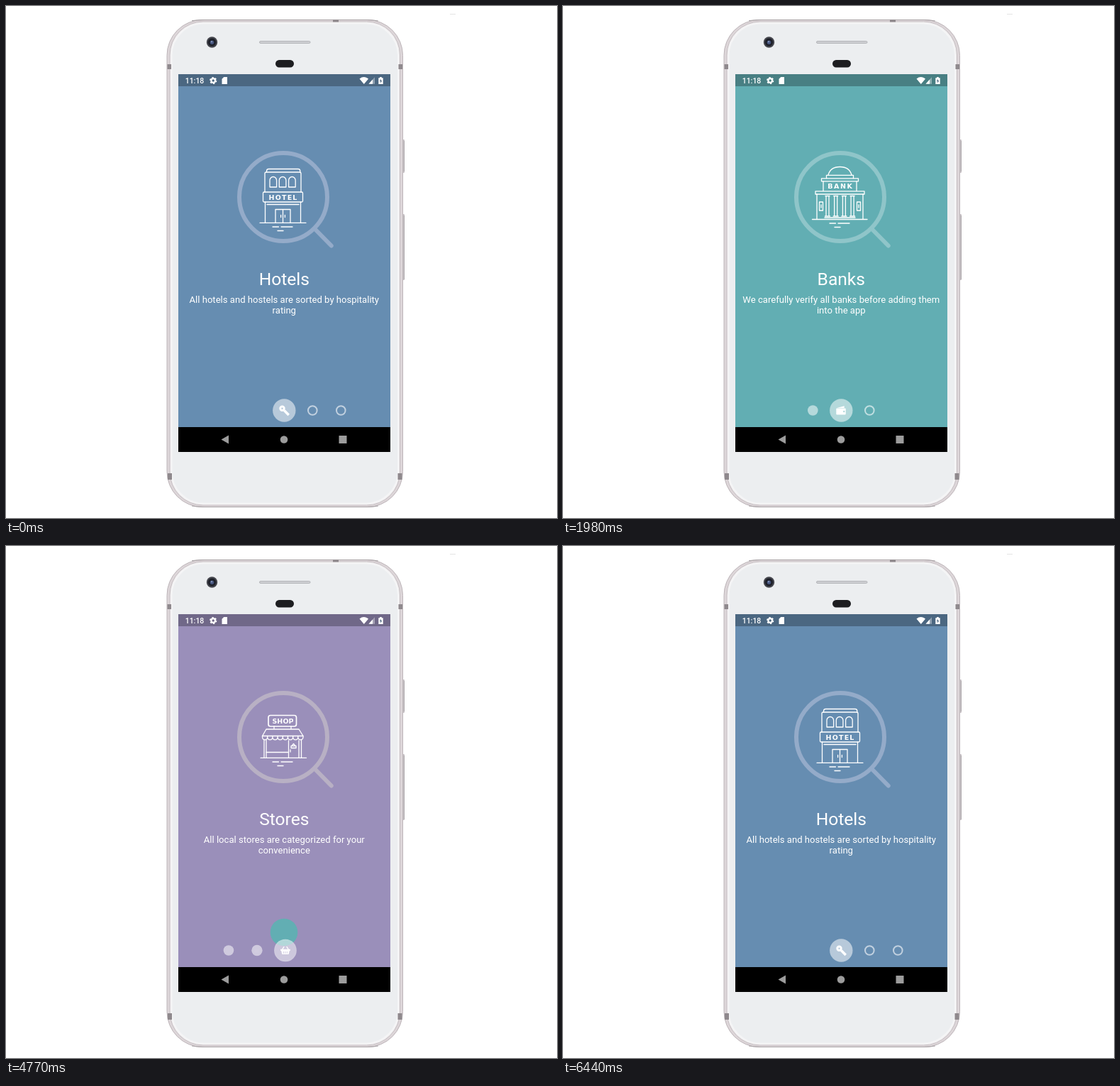
An HTML page for the animation above (7770 ms loop, 777 by 721 pixels).

```html
<!DOCTYPE html>
<html lang="en">
<head>
<meta charset="utf-8">
<title>Onboarding</title>
<style>
  html, body { margin: 0; width: 100%; height: 100%; overflow: hidden; background: #fff; }
  svg { display: block; }
  text { font-family: Roboto, sans-serif; fill: #fff; text-anchor: middle; }
  .title { font-size: 24.6px; }
  .sub { font-size: 13.1px; }
  .sign { font: bold 9.5px "DejaVu Sans", sans-serif; stroke: none; }
  .line { fill: none; stroke: #fff; stroke-width: 1.3; stroke-linejoin: round; stroke-linecap: round; }
</style>
</head>
<body>
<svg width="777" height="721" viewBox="0 0 777 721">
  <defs>
    <clipPath id="screen"><rect x="243" y="96" width="299" height="497"/></clipPath>
    <clipPath id="reveal"><circle id="hole" cx="392" cy="544" r="0"/></clipPath>
  </defs>

  <!-- phone -->
  <path d="M626 11.5h8" stroke="#e4e4e4"/>
  <g fill="#cbc5c9">
    <rect x="558" y="188" width="4" height="47" rx="1"/>
    <rect x="558" y="293" width="4" height="93" rx="1"/>
  </g>
  <path d="M561.5 190v43M561.5 295v90" stroke="#aaa4a9"/>
  <rect x="227" y="19.5" width="332.5" height="686" rx="50" fill="#ddd6d9" stroke="#bdb5b9"/>
  <rect x="231" y="22" width="324.5" height="681" rx="47" fill="#f0eff0" stroke="#c6bec2"/>
  <rect x="233.5" y="24.5" width="319.5" height="676" rx="45" fill="#eceef0" stroke="#f5f5f6" stroke-width="2"/>
  <path d="M262 20.7Q270 19.5 280 19.5H508Q518 19.5 525 21" fill="none" stroke="#a9a3a6"/>
  <path d="M262 704Q270 705.5 280 705.5H508Q518 705.5 525 704" fill="none" stroke="#a9a3a6"/>
  <g fill="#8f898d">
    <rect x="227.5" y="82" width="5.5" height="7"/><rect x="553.5" y="82" width="5.5" height="7"/>
    <rect x="228" y="658" width="6" height="9"/><rect x="552.5" y="658" width="6" height="9"/>
    <rect x="461" y="19.5" width="8" height="3"/>
  </g>
  <circle cx="290.5" cy="51" r="7.7" fill="#44454c"/>
  <circle cx="290.5" cy="51" r="5.6" fill="#1d1f28"/>
  <circle cx="290.5" cy="51.3" r="2.8" fill="#46547c"/>
  <circle cx="290" cy="50.3" r="1.1" fill="#8a9cc4"/>
  <rect x="357.5" y="49.5" width="71.5" height="3" rx="1.5" fill="#cfd0d3" stroke="#b3b4b8"/>
  <rect x="380" y="76" width="26" height="10.5" rx="5.2" fill="#1d1d20"/>

  <g clip-path="url(#screen)">
    <g id="pages"></g>
    <rect x="243" y="96" width="299" height="17" fill="#000" opacity=".27"/>
    <g id="dots"></g>
  </g>

  <!-- status bar -->
  <text x="266" y="109" font-size="10.5" font-weight="500">11:18</text>
  <circle cx="292.2" cy="105" r="2.8" fill="none" stroke="#fff" stroke-width="2.2"/>
  <circle cx="292.2" cy="105" r="4.3" fill="none" stroke="#fff" stroke-width="1.6" stroke-dasharray="2.25 2.25"/>
  <path d="M307.3 100H312V110H304.5V102.8Z" fill="#fff"/>
  <path d="M498.5 102.5Q504.7 97.7 511 102.5L504.8 110Z" fill="#fff"/>
  <path d="M520 100.3V109.7H511.5Z" fill="#fff" opacity=".4"/>
  <path d="M517 103.6V109.7H511.5Z" fill="#fff"/>
  <path d="M525.3 101.2H527.2V100H529.8V101.2H531.7V110H525.3Z" fill="#fff"/>
  <path d="M528.9 102.5L526.9 106H528.2V108.8L530.2 105H528.9Z" fill="#526b84"/>

  <!-- navigation bar -->
  <rect x="243" y="593" width="299" height="35" fill="#000"/>
  <g fill="#9c9c9c">
    <path d="M303.5 610.5L314 604.5V616.5Z"/>
    <circle cx="392" cy="610.5" r="5.3"/>
    <rect x="469.5" y="605" width="11" height="11"/>
  </g>
</svg>
<script>
const $ = id => document.getElementById(id);
const join = (n, f) => Array.from({ length: n }, (_, i) => f(i)).join('');
const box = (x, y, w, h, r = 0) => `<rect x="${x}" y="${y}" width="${w}" height="${h}" rx="${r}"/>`;
const path = d => `<path d="${d}"/>`;
const sign = (word, y, gap) =>
  `<text class="sign" x="${390.5 + gap / 2}" y="${y}" letter-spacing="${gap}">${word}</text>`;
const puddle = y => path(`M376 ${y}h8.5M388 ${y}h16M383 ${y + 5.5}h8`);

const hotel =
  path('M367.5 234V232.5Q367.5 229.5 370.5 229.5H412Q414.8 229.5 414.8 232.5V234') +
  path('M365 262V236Q365 234 367 234H414Q416 234 416 236V262') +
  join(3, i => path(`M${372 + i * 13.3} 255v-9.5a4.8 5 0 0 1 9.6 0v9.5z`)) +
  box(362.5, 262, 56, 14, 1.5) + sign('HOTEL', 273, 1.2) +
  path('M365.5 276V305M415.5 276V305M358 305.3H423') +
  path('M368 279.5H413') +
  path('M380 305V286.5H401V305M390.5 286.5V305M387.6 294.5v3M393.4 294.5v3') +
  puddle(311);

const bank =
  path('M374 238Q377 226.5 390.5 226.5Q404 226.5 407 238') +
  path('M371.5 242.5V238.3H409.5V242.5') + box(364.5, 242.8, 52, 4) +
  path('M367 247V260.5M414 247V260.5') + sign('BANK', 257.2, 1.6) +
  box(356, 260.8, 69, 4.2) + path('M358 265V300M423 265V300M351.5 300.5H429') +
  box(361.5, 276, 5, 12) + box(414.5, 276, 5, 12) + path('M364 280v4M417 280v4') +
  join(4, i => {
    const x = 373 + i * 11.7;
    return path(`M${x - 3} 267.5h6M${x - 2} 268v27M${x + 2} 268v27M${x - 3.5} 296h7`);
  }) +
  path('M369 298H412') + puddle(306);

const shop =
  `<g stroke-width="1.7">${box(370, 238.5, 39.5, 15.5, 3)}</g>` + sign('SHOP', 250, .1) +
  path('M378 254v4M402 254v4M367 258H413L419 267.5H361.5Z') +
  path('M361.5 267.5' + join(8, () => 'v1.5a3.6 4 0 0 0 7.19 0v-1.5')) +
  path('M364 273V298M367 273V298M416.5 273V298M359 298.3H423.5') +
  path('M367 290.5H398.5M398.5 274V298M413 274V298M401 287v3') +
  path('M402 284.5v-3h7v3zM403 281.5l2.5-3l2.5 3') +
  puddle(304);

const pages = [
  ['#668db1', '#94abc9', hotel, 'Hotels', 'All hotels and hostels are sorted by hospitality', 'rating'],
  ['#62aeb3', '#8fc5c9', bank, 'Banks', 'We carefully verify all banks before adding them', 'into the app'],
  ['#9a8fba', '#b8b0c4', shop, 'Stores', 'All local stores are categorized for your', 'convenience'],
].map(([color, lens, art, title, a, b]) => {
  const g = document.createElementNS('http://www.w3.org/2000/svg', 'g');
  g.innerHTML = `<rect x="243" y="96" width="299" height="497" fill="${color}"/>
    <g><g fill="none" stroke="${lens}" stroke-width="6" stroke-linecap="round">
      <circle cx="391" cy="269" r="62"/><path d="M435.5 314L458.7 337.5"/></g>
      <g class="line">${art}</g></g>
    <g><text class="title" x="392.3" y="392.7">${title}</text>
      <text class="sub" x="392.3" y="418">${a}</text>
      <text class="sub" x="392.3" y="433">${b}</text></g>`;
  const [, icon, words] = g.children;
  return { g, icon, words };
});

const glyphs = [
  '<circle cx="-2.8" cy="-2.8" r="2.7" fill="none" stroke="#fff" stroke-width="3"/>' +
    '<path d="M0 0L6.4 6.4" stroke="#fff" stroke-width="3.6"/>',
  '<path d="M-6-3.6L4.4-6.2V-3.6Z" fill="#fff"/><rect x="-7" y="-2.9" width="13.4" height="8.9" rx="1" fill="#fff"/>' +
    '<circle cx="4" cy="1.5" r="1.2" fill="#b0d7d9"/>',
  '<path d="M-7-1.8H7V.6H6L4.8 5.7H-4.8L-6 .6H-7Z" fill="#fff"/>' +
    '<path d="M-4.5-1.5L-1.8-5.6M4.5-1.5L1.8-5.6" stroke="#fff" stroke-width="1.4"/>' +
    '<path d="M-2.5 1.5v3M0 1.5v3M2.5 1.5v3" stroke="#cdc8de" stroke-width=".8"/>',
];
$('dots').innerHTML = glyphs.map(glyph =>
  `<g><circle fill="#fff"/><circle fill="none" stroke="#fff" stroke-width="2"/><g>${glyph}</g></g>`).join('');
const dots = [...$('dots').children];

// [ms, page below, page on top, progress]
const steps = [
  [0, 0, 0, 1],
  ...Array.from([1520, 1560, 1600, 1640, 1690, 1730, 1770, 1810], (t, i) => [t, 0, 1, .128 + i * .0723]),
  [1980, 1, 1, 1],
  [3150, 1, 2, .151], [3240, 1, 2, .35], [3300, 1, 2, .6], [3360, 2, 2, 1],
  [4770, 2, 1, .13], [4890, 2, 1, .28], [5000, 2, 1, .43], [5120, 2, 1, .575], [5410, 1, 1, 1],
  [6280, 1, 0, .14], [6360, 1, 0, .5], [6440, 0, 0, 1],
];
const LOOP = 7770;
const ease = p => (1 - Math.cos(Math.PI * p)) / 2;

function place(page, k) {
  page.icon.setAttribute('transform', `translate(0 ${36 * (1 - k)})`);
  page.words.setAttribute('transform', `translate(0 ${22 * (1 - k)})`);
  page.icon.setAttribute('opacity', k ** .8);
  page.words.setAttribute('opacity', k ** .8);
}

function drawDot(dot, i, pos) {
  const d = i - pos, near = Math.max(0, 1 - Math.abs(d));
  const [disc, ring, glyph] = dot.children;
  const r = 7.3 + 8.9 * near;
  dot.setAttribute('transform', `translate(${392.3 + 40 * d} 569.5)`);
  disc.setAttribute('r', r);
  disc.setAttribute('opacity', d <= 0 ? .53 : .53 * near);
  ring.setAttribute('r', r - 1);
  ring.setAttribute('opacity', d <= 0 ? 0 : .6 * Math.min(1, 1.6 * (1 - near)));
  glyph.setAttribute('opacity', near);
  glyph.setAttribute('transform', `scale(${r / 16.2})`);
}

let shown;
function draw(t) {
  const step = steps.findLast(s => s[0] <= t);
  if (step === shown) return;
  shown = step;
  const [, from, to, p] = step, k = ease(p);
  const below = pages[from], top = pages[to];
  below.g.removeAttribute('clip-path');
  place(below, 1);
  place(top, k);
  if (from !== to) top.g.setAttribute('clip-path', 'url(#reveal)');
  $('hole').setAttribute('r', 470 * k);
  $('pages').replaceChildren(...new Set([below.g, top.g]));
  dots.forEach((dot, i) => drawDot(dot, i, from + (to - from) * k));
}

const start = performance.now();
function tick() {
  draw((performance.now() - start) % LOOP);
  requestAnimationFrame(tick);
}
tick();
</script>
</body>
</html>
```
